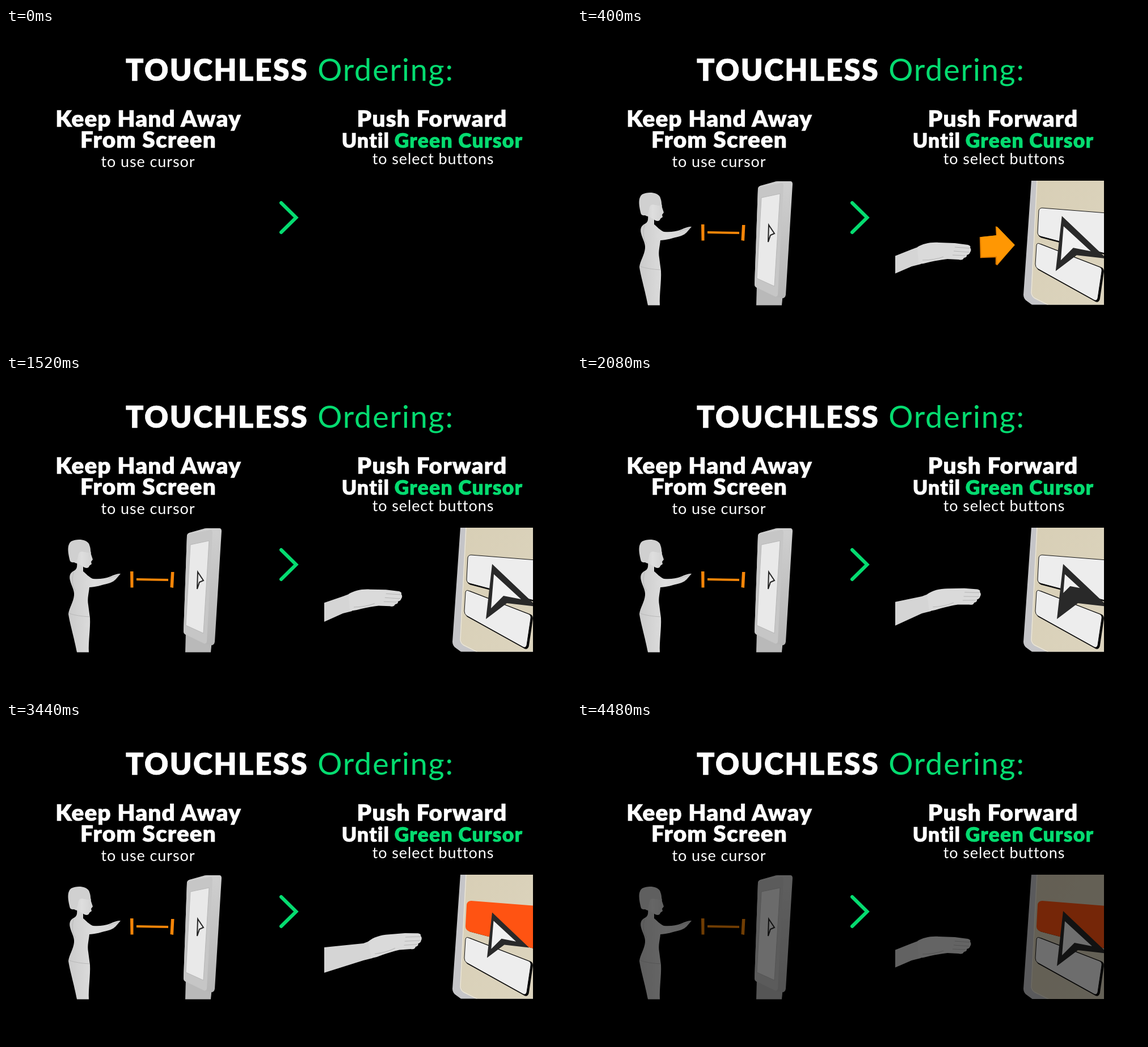
These frames come from a looping animation (996x562 px, 4560 ms). An HTML page:

```html
<!DOCTYPE html>
<html lang="en">
<head>
<meta charset="utf-8">
<title>Touchless Ordering</title>
<style>
html, body { margin: 0; width: 100%; height: 100%; overflow: hidden; background: #000; }
svg { display: block; width: 996px; height: 562px; }
text { font-family: Lato, "Open Sans", sans-serif; text-anchor: middle; fill: #fff; }
.title { font-size: 52px; letter-spacing: 2.3px; }
.light { font-size: 54px; letter-spacing: 1.8px; }
.head { font-size: 40.5px; letter-spacing: 1.1px; }
.sub { font-size: 35.5px; letter-spacing: 1.2px; }
.note { font-size: 27px; letter-spacing: .9px; }
.black { font-weight: 900; stroke: #fff; stroke-width: .7px; }
.green { fill: #05dc70; }
.black.green { stroke: #05dc70; }
</style>
</head>
<body>
<svg viewBox="0 0 996 562">
  <defs>
    <clipPath id="view"><path d="M561 269H929V487.500H561Z"/></clipPath>
    <linearGradient id="skin" x2="1" y2="0"><stop stop-color="#cbcbcb"/><stop offset=".5" stop-color="#dedede"/><stop offset="1" stop-color="#d2d2d2"/></linearGradient>
    <linearGradient id="side" x2="0" y2="1"><stop stop-color="#cfcfcf"/><stop offset="1" stop-color="#b6b6b6"/></linearGradient>
    <linearGradient id="panel" x2="1" y2="1"><stop stop-color="#d8cfb6"/><stop offset="1" stop-color="#dcd4be"/></linearGradient>
    <path id="button1" d="M820 317L934 326V398L817 367Q812 365 812 360L814 322Q815 317 820 317Z"/>
    <path id="button2" d="M815 380L921 421Q926 423 925 429L918 476Q916 482 911 479L812 424Q808 421 808 416L810 383Q811 378 815 380Z"/>
  </defs>
  <rect width="996" height="562"/>

  <text class="title black" x="372" y="93">TOUCHLESS</text>
  <text class="title light green" x="669.500" y="93">Ordering:</text>
  <text class="head black" x="251" y="174">Keep Hand Away</text>
  <text class="head black" x="251" y="211">From Screen</text>
  <text class="note" x="250.500" y="245">to use cursor</text>
  <text class="head black" x="751" y="174">Push Forward</text>
  <text class="sub black" x="634" y="211">Until</text>
  <text class="sub black green" x="798" y="211">Green Cursor</text>
  <text class="note" x="753" y="240">to select buttons</text>
  <path d="M485 308L511.500 334L485 360" fill="none" stroke="#05dc70" stroke-width="6" stroke-linecap="round"/>

  <g id="scene">
    <!-- person -->
    <g fill="url(#skin)">
      <path d="M125 330C126 340 124 343 118 346C113 349 111 354 113 362C115 371 121 379 120 388C119 400 111 411 110 421C112 436 120 462 125 488.500H146C145 470 149 446 148 428L145 405C143 393 146 385 147 374C157 374 169 370 181 367C188 365 192 362 196 357L202 350C196 350 190 352 184 355C174 359 163 360 153 359C146 356 141 350 136 346L136 334Z"/>
      <path d="M114 312C112 325 118 331 126 332L135 337C140 341 146 341 147 336L151 333L150 329L153 325L150 316L148 302Z"/>
      <path d="M113 328C109 313 107 299 115 293C125 288 141 289 146 297C149 303 148 309 150 314C140 313 134 310 130 312C126 316 128 323 124 328C120 331 116 331 113 328Z" fill="#d0d0d0"/>
    </g>
    <path d="M111 420Q126 425 148 426M119 347Q114 368 122 380M181 358L200 352" fill="none" stroke="#b9b9b9"/>

    <!-- distance bracket -->
    <path d="M219 346H224.500V374.500H219.500ZM230 358L286 359V363L230 362ZM291 347H296.500L295 375L289.500 374Z" fill="#f58508"/>

    <!-- kiosk -->
    <path d="M317 452L316 488.500H361L363 468Z" fill="#b9b9b9"/>
    <path d="M319 282Q320 279 323 278L348 271Q350 270 354 270H376Q380 270 380 275L368 470Q367 476 362 476L351 474L316 457Q313 455 313 452Z" fill="url(#side)"/>
    <path d="M319 283Q320 280 324 280L361 273Q364 273 364 278L354 470Q353 474 349 473L316 457Q313 455 313 452Z" fill="#c6c6c6"/>
    <path d="M325 299L358 292L348 455L317 441Z" fill="#e9e9e9" stroke="#b7b7b7"/>
    <path d="M338 347L348 362L341 365L337 377Z" fill="#ececec" stroke="#242424" stroke-width="2"/>

    <!-- close-up -->
    <g clip-path="url(#view)">
      <path d="M801 268L787 470Q787 477 793 481L804 489H931V268Z" fill="#c5c5c8"/>
      <path d="M812 268L802 465Q802 472 807 475L835 489H931V268Z" fill="url(#panel)"/>
      <path d="M811 268L801 467Q802 473 807 476L833 489" fill="none" stroke="#eee7d3" stroke-width="1.500"/>
      <use href="#button1" x="1.500" y="1.500" stroke="#080808" stroke-width="2"/>
      <use id="target" href="#button1"/>
      <use href="#button2" x="2.500" y="1.500" stroke="#080808" stroke-width="2.500"/>
      <use href="#button2" fill="#ededed" stroke="#111"/>
      <g id="cursor">
        <path id="outer" d="M857 333L936 408L883 402L846 430Z"/>
        <path id="inner" d="M860 351L908 395L877 389L855 411Z" fill="#f1f1f1"/>
      </g>
      <g id="arrow">
        <path d="M711 370L740 367L739 351L743 353L773 384L742 420L739 418L739 406L712 407Z" fill="#dd7b00"/>
        <path d="M713 370L741 367L741 351L773 384L742 418L741 404L714 405Z" fill="#ff9703"/>
      </g>
      <path id="arm" fill="#d5d5d5"/>
      <g id="hand">
        <path d="M600 386C610 380 622 377 638 378L666 379L689 382Q695 384 693 387Q696 391 693 395Q692 399 687 400Q688 404 682 405Q680 410 673 408L653 407C643 408 632 410 623 412Q613 415 602 416Z" fill="#dadada"/>
        <path d="M666 386L692 388M664 393L691 395M662 400L685 401M609 409Q630 409 646 403" fill="none" stroke="#b5b5b5"/>
      </g>
    </g>
  </g>
</svg>
<script>
const LOOP = 4560, STEP = 80;
const el = id => document.getElementById(id);
const set = (id, attrs) => {
  for (const name in attrs) el(id).setAttribute(name, attrs[name]);
};
const clamp = v => Math.max(0, Math.min(1, v));
const ramp = (t, from, to) => clamp((t - from) / (to - from));

// Linear interpolation through [time, value] points
function track(t, points) {
  let value = points[0][1];
  for (let i = 1; i < points.length; i++) {
    const [t0, a] = points[i - 1], [t1, b] = points[i];
    if (t >= t0) value = a + (b - a) * ramp(t, t0, t1);
  }
  return value;
}

const scaleAt = (x, y, k) => `translate(${x} ${y}) scale(${k}) translate(${-x} ${-y})`;

// The wrist slides level while the hand tilts up around it
function drawHand(push) {
  const top = 402 - push * 0.12, bottom = 433 + Math.min(push * 0.55, 9);
  const x = 604 + push;
  set('hand', { transform: `translate(${push}) rotate(${-push * 0.17} 606 400)` });
  set('arm', { d: `M560 ${top}L${x - 14} 390L${x + 2} 384V416L${x - 14} 420L560 ${bottom}Z` });
}

function draw(t) {
  set('scene', { opacity: Math.min(ramp(t, 0, 250), 1 - ramp(t, 4340, 4600)) });
  drawHand(track(t, [[1240, 0], [1600, 5], [2080, 18], [2800, 41], [3040, 44], [3440, 40], [4000, 21], [4440, 1], [4480, 0]]));

  const drift = 1 - ramp(t, 80, 800);
  set('arrow', {
    transform: `translate(${-2.2 * drift} ${-3.2 * drift})`,
    opacity: 1 - ramp(t, 1200, 1520)
  });

  const press = track(t, [[2560, 0], [2720, 1], [3360, 1], [3520, 0]]);
  const green = t >= 2640 && t < 3440;
  set('cursor', {
    transform: `translate(${-4 * drift} ${-3 * drift + 5 * press}) ` + scaleAt(857, 333, 1 - 0.35 * press)
  });
  set('outer', { fill: green ? '#30c427' : '#292929' });
  const hollow = t < 3440 ? 1 - ramp(t, 1560, 2720) : 1;
  set('inner', { transform: scaleAt(860, 351, hollow), opacity: green ? 0 : 1 });

  const selected = t >= 3040;
  set('target', { fill: selected ? '#ff5312' : '#ededed', stroke: selected ? '#ff5312' : '#111', 'stroke-width': selected ? 4 : 1 });
}

const start = performance.now();
function tick() {
  const t = (performance.now() - start) % LOOP;
  draw(Math.floor(t / STEP) * STEP);
  requestAnimationFrame(tick);
}
tick();
</script>
</body>
</html>
```
